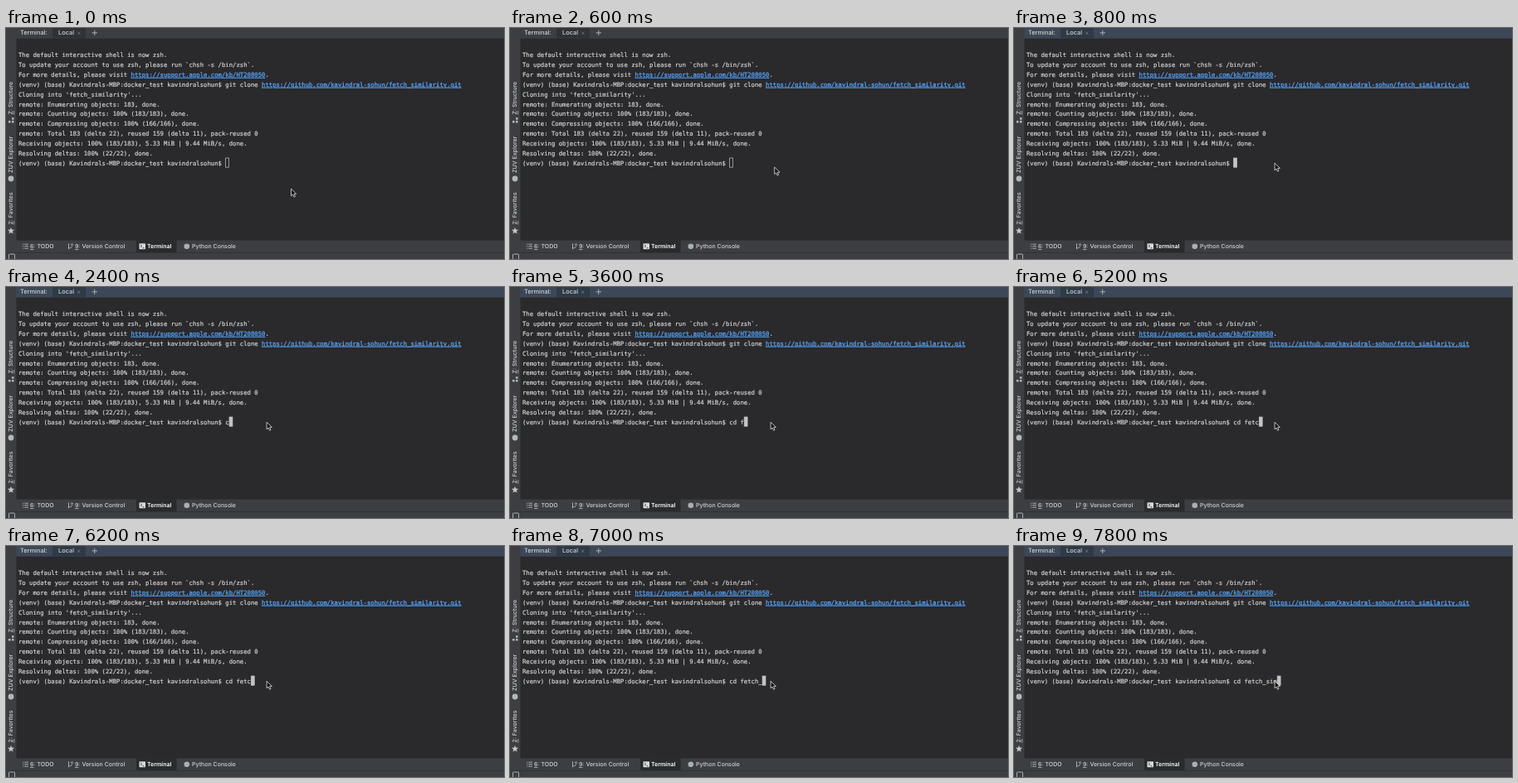
Animation, 600 px wide and 279 px high, one loop 8000 ms. Source, as an HTML page:

```html
<!DOCTYPE html>
<html lang="en">
<head>
<meta charset="utf-8">
<title>Terminal</title>
<style>
  html, body { margin: 0; width: 100%; height: 100%; overflow: hidden; background: #3c3e42; }
  svg { display: block; width: 600px; height: 279px; }
  text { white-space: pre; text-rendering: geometricPrecision; }
  .term { font: 7.275px "DejaVu Sans Mono", monospace; fill: #d2d2d2; stroke: #d2d2d2; stroke-width: .2; }
  .ui { font: 500 7px Inter, sans-serif; fill: #d0d2d4; }
  .head { font-size: 7.4px; }
  .link { fill: #559ff5; stroke: #559ff5; stroke-width: .3; text-decoration: underline; }
  .key { text-decoration: underline; }
  .on { font-weight: 600; fill: #fff; }
  .icon { fill: none; stroke: #b4b8bb; stroke-width: .9; }
</style>
</head>
<body>
<svg viewBox="0 0 600 279">
  <rect width="600" height="279" fill="#3c3e42"/>
  <rect x="12.5" y="12.5" width="588" height="244" fill="#2a292b"/>

  <!-- header -->
  <rect id="header" x="12.5" width="588" height="12.5"/>
  <rect id="tab" x="56" width="40" height="12.5"/>
  <g class="ui">
    <text class="head" x="17" y="8.3">Terminal:</text>
    <text class="head" x="63" y="8.3">Local</text>
  </g>
  <path class="icon" d="M86 4.5l3.4 3.4m0-3.4l-3.4 3.4" opacity=".45"/>
  <path class="icon" d="M103.6 5.8h6.4M106.8 2.6v6.4"/>

  <!-- left strip -->
  <g class="ui">
    <text transform="translate(8.4 104.5) rotate(-90)"><tspan class="key">Z</tspan>: Structure</text>
    <text transform="translate(8.4 175) rotate(-90)">ZUV Explorer</text>
    <text transform="translate(8.4 237.5) rotate(-90)"><tspan class="key">2</tspan>: Favorites</text>
  </g>
  <path d="M3 112h2.5v2.5H3zM7 112h2.5v2.5H7zM7 108.3h2.5v2.5H7z" fill="#b4b8bb"/>
  <circle cx="6" cy="182" r="3.4" fill="#b4b8bb"/>
  <path d="M6 240.8l1.1 2.8 3 .2-2.3 1.9.8 2.9L6 247l-2.6 1.6.8-2.9-2.3-1.9 3-.2z" fill="#c4c6c8"/>

  <!-- bottom strip -->
  <rect x="157" y="256.5" width="48.5" height="14.5" fill="#292b2d"/>
  <path d="M0 271.5H600" stroke="#303234"/>
  <path class="icon" d="M20 261.2h1.2m1 0H27M20 263.7h1.2m1 0H27M20 266.2h1.2m1 0H27"/>
  <path class="icon" d="M75.5 260.2v7M75.5 265.7c4 0 4-1 4-4M78 262.2l1.6-1.8 1.6 1.8"/>
  <rect x="160.5" y="260.2" width="7.5" height="7" rx=".6" fill="#d8dadc"/>
  <path d="M162 261.7l1.8 1.6-1.8 1.6M164.5 265.7h2" fill="none" stroke="#292b2d" stroke-width=".8"/>
  <circle cx="217.8" cy="263.7" r="3.3" fill="#a9b0b5"/>
  <g class="ui">
    <text x="29" y="266.1"><tspan class="key">6</tspan>: TODO</text>
    <text x="83" y="266.1"><tspan class="key">9</tspan>: Version Control</text>
    <text class="on" x="170" y="266.1">Terminal</text>
    <text x="224" y="266.1">Python Console</text>
  </g>
  <rect class="icon" x="3.5" y="273" width="7" height="7" rx=".8"/>

  <g id="lines" class="term"></g>
  <rect id="caret" y="157" width="3.9" height="11.2" stroke="#c4c4c4" stroke-width=".7"/>
  <path id="mouse" d="M0 0V8.6L2 6.8 3.4 10 4.9 9.3 3.6 6.2H6.3Z"
        fill="#111" stroke="#e4e4e4" stroke-width=".8" stroke-linejoin="round"/>
</svg>
<script>
const LOOP = 8000, LEFT = 15, PITCH = 4.38, ROW = 11.88, BASE = 35.2;
const $ = id => document.getElementById(id);

const prompt = "(venv) (base) Kavindrals-MBP:docker_test kavindralsohun$ ";
const rows = [
  "The default interactive shell is now zsh.",
  "To update your account to use zsh, please run `chsh -s /bin/zsh`.",
  "For more details, please visit https://support.apple.com/kb/HT208050.",
  prompt + "git clone https://github.com/kavindral-sohun/fetch_similarity.git",
  "Cloning into 'fetch_similarity'...",
  "remote: Enumerating objects: 183, done.",
  "remote: Counting objects: 100% (183/183), done.",
  "remote: Compressing objects: 100% (166/166), done.",
  "remote: Total 183 (delta 22), reused 159 (delta 11), pack-reused 0",
  "Receiving objects: 100% (183/183), 5.33 MiB | 9.44 MiB/s, done.",
  "Resolving deltas: 100% (22/22), done.",
  prompt
];
const link = s => s.replace(/https:\S*\w/, '<tspan class="link">$&</tspan>');
$("lines").innerHTML = rows.map((s, i) =>
  `<text x="${LEFT}" y="${BASE + i * ROW}">${link(s)}</text>`).join("");
const input = $("lines").lastChild;

// [time, key]; "<" deletes one character
const keys = [
  [2400, "c"], [2800, "d"], [3200, " "], [3600, "f"], [3800, "e"], [4000, "t"],
  [4200, "c"], [4400, "g"], [5000, "<"], [6400, "h"], [6800, "_"], [7200, "s"],
  [7600, "i"], [7800, "m"]
];
const typedAt = t => keys.filter(k => k[0] <= t)
  .reduce((s, k) => k[1] === "<" ? s.slice(0, -1) : s + k[1], "");

function draw(now) {
  const t = Math.floor(now % LOOP / 200) * 200;
  const focused = t >= 800;
  const typed = typedAt(t);
  const p = Math.min(t / 800, 1), move = p * p * (3 - 2 * p);

  input.textContent = prompt + typed;
  $("caret").setAttribute("x", LEFT + PITCH * (prompt.length + typed.length));
  $("caret").setAttribute("fill", focused ? "#c4c4c4" : "none");
  $("header").setAttribute("fill", focused ? "#3c4857" : "#3c3e42");
  $("tab").setAttribute("fill", focused ? "#2f3a47" : "#303235");
  $("mouse").setAttribute("transform",
    `translate(${343.5 - 29.4 * move} ${194.2 - 31 * move})`);
  requestAnimationFrame(draw);
}
requestAnimationFrame(draw);
</script>
</body>
</html>
```
